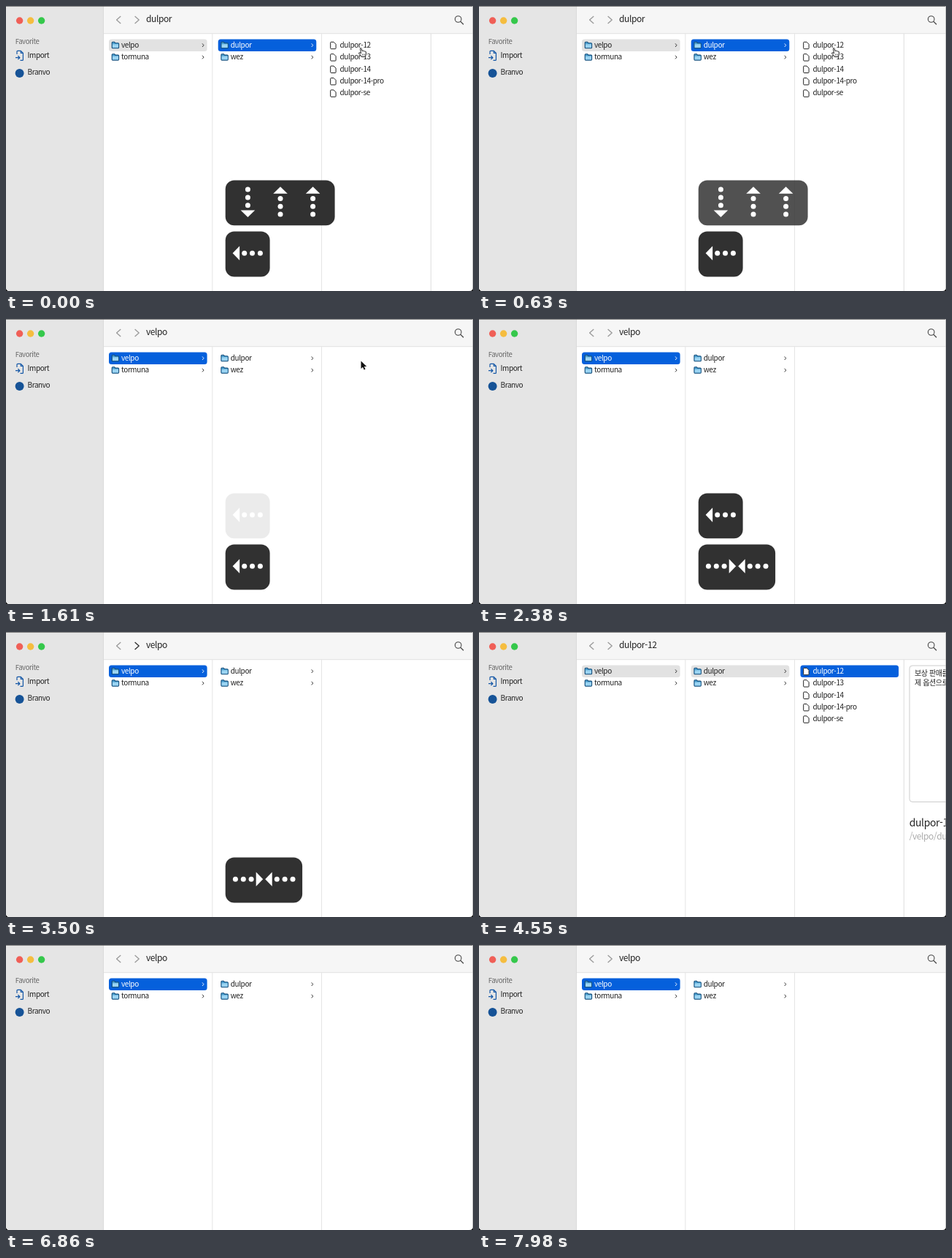
These frames come from a looping animation (640x390 px, 8 s). An HTML page:

```html
<!DOCTYPE html>
<html lang="ko">
<head>
<meta charset="utf-8">
<style>
  html, body { margin: 0; width: 100%; height: 100%; overflow: hidden; background: #111; }
  svg { display: block; width: 640px; height: 390px; }
  text { font: 10px "Noto Sans CJK KR", "Noto Sans", sans-serif; letter-spacing: -.4px; fill: #222; white-space: pre; }
</style>
</head>
<body>
<svg id="stage" viewBox="0 0 640 390"></svg>
<script>
const LOOP = 8000, FRAME = 70, FADE = 450;
const BLUE = '#0560dc', GREY = '#e2e2e2';
const stage = document.getElementById('stage');

const columns = [
  { x: 141, names: ['velpo', 'tormuna'] },
  { x: 290.7, names: ['dulpor', 'wez'] },
  { x: 440.5, names: ['dulpor-12', 'dulpor-13', 'dulpor-14', 'dulpor-14-pro', 'dulpor-se'], files: true }
];

// [time, depth of the selected item]
const selections = [[0, 2], [1190, 1], [1680, 2], [1820, 1], [3640, 2], [4200, 3], [5180, 2], [5460, 1]];

// Each card holds [time, direction] key presses; newer cards push older ones up.
const cards = [
  { keys: [[-2, 'down'], [-2, 'up'], [-2, 'up']], fade: 560 },
  { keys: [[-1, 'left']], fade: 1200 },
  { keys: [[1190, 'left']], fade: 2850 },
  { keys: [[1680, 'right'], [1820, 'left']], fade: 3500 }
];
const angles = { left: 0, up: 90, right: 180, down: 270 };

const clamp = v => Math.max(0, Math.min(1, v));
const between = (t, a, b) => t >= a && t < b;
const rect = (x, y, w, h, fill, extra = '') =>
  `<rect x="${x}" y="${y}" width="${w}" height="${h}" fill="${fill}" ${extra}/>`;
const circle = (x, y, r, fill, extra = '') =>
  `<circle cx="${x}" cy="${y}" r="${r}" fill="${fill}" ${extra}/>`;
const path = (d, stroke, width = 1, fill = 'none', extra = '') =>
  `<path d="${d}" stroke="${stroke}" stroke-width="${width}" fill="${fill}" stroke-linejoin="round" ${extra}/>`;
const text = (x, y, str, size = 10, fill = '#222') =>
  `<text x="${x}" y="${y}" style="font-size:${size}px;fill:${fill}">${str}</text>`;
const at = (x, y, body) => `<g transform="translate(${x} ${y})">${body}</g>`;

const folder = path('M.6 1.6Q.6.6 1.5.6H4L5.2 2H9Q10 2 10 3V8Q10 9 9 9H1.5Q.6 9 .6 8Z', '#174f7c', 1.1, '#4b9fcf') +
  rect(1.4, 3.6, 8, 4.7, '#9bd4f2');
const page = path('M.6 1.4Q.6.6 1.4.6H5L8 3.6V9Q8 10 7 10H1.5Q.6 10 .6 9Z', '#222', 1, '#fff');
const hand = path('M2.4 1.4Q3.6.2 4.2 1.7L5 5Q6.2 4.2 6.8 5.2Q8 4.5 8.5 5.6Q10 5 10.3 6.5L10.4 9.5L9.4 13H4.3Q3.2 10.7.7 8.6Q.2 7.2 1.8 7.2L3.5 8.4Z', '#222', 1, '#fff') +
  path('M5.4 9V11.5M7.1 9V11.5M8.8 9V11.5', '#333', .6);
const arrow = path('M0 0V10.5L2.5 8.3L4.2 12L6 11.2L4.3 7.6H7.7Z', '#fff', 1, '#111', 'paint-order="stroke"');

function chrome(title, backDark, forwardDark) {
  const nav = dark => dark ? '#2d2d2d' : '#9a9a9a';
  return rect(134, 0, 506, 38, '#f6f6f6') + rect(134, 37.3, 506, .9, '#dedede') +
    rect(0, 0, 133.5, 390, '#e5e5e5') + rect(133, 0, .8, 390, '#d4d4d4') +
    ['#f05f57', '#f5bd3f', '#35c84b'].map((c, i) => circle(18.6 + 15 * i, 20, 4.7, c)).join('') +
    text(12.7, 52.2, 'Favorite', 9.5, '#666') +
    path('M15 66V62.3Q15 61.4 16 61.4H20.3L23.4 64.5V73.5Q23.4 74.4 22.5 74.4H19.5M20.3 61.4V64.5H23.4', '#1457a6', 1.2) +
    path('M13 70.7H18.7M16.4 68.3L18.9 70.7L16.4 73.1', '#1457a6', 1.2) +
    text(29.5, 70.7, 'Import') +
    circle(18.6, 92, 6, '#165397') + text(29.5, 94.3, 'Branvo') +
    path('M157.2 14L151.6 19L157.2 24.1', nav(backDark), 1.3) +
    path('M176.6 14L182.2 19L176.6 24.1', nav(forwardDark), 1.3) +
    text(192, 22.3, title, 12) +
    circle(619.7, 18, 4.3, 'none', 'stroke="#444" stroke-width="1.1"') +
    path('M622.8 21.1L627 25.2', '#444', 1.3);
}

function column({ x, names, files }, index, depth) {
  return rect(x + 141.4, 38, .9, 352, '#e2e2e2') + names.map((name, i) => {
    const y = 45.4 + 16.4 * i;
    const picked = i === 0 && index < depth;
    const active = picked && index === depth - 1;
    const ink = active ? '#fff' : '#222';
    return (picked ? rect(x, y, 134.6, 16.6, active ? BLUE : GREY, 'rx="3.5"') : '') +
      at(x + 3.6, y + 3.3, files ? page : folder) +
      text(x + 17, y + 11.4, name, 10, ink) +
      (files ? '' : path(`M${x + 128} ${y + 6}l2 2.3l-2 2.3`, ink, .9));
  }).join('');
}

function preview() {
  return rect(590, 46, 80, 186.5, '#fff', 'rx="4" stroke="#ccc"') +
    text(597, 60, '보상 판매를') + text(597, 73, '제 옵션으로') +
    text(589.7, 266.3, 'dulpor-12', 14) +
    text(589.7, 284.3, '/velpo/dulpor/dulpor-12', 12, '#aaa');
}

function key(direction, x) {
  return `<g transform="translate(${x} 29.7) rotate(${angles[direction]})">` +
    '<path d="M-20.8 0L-11.3 -9.8V9.8Z" fill="#fff"/>' +
    [-4.7, 6.1, 17].map(d => circle(d, 0, 3.5, '#fff')).join('') + '</g>';
}

function card({ keys, fade }, index, t) {
  const opacity = clamp(1 - (t - fade) / FADE);
  const pressed = keys.filter(k => k[0] <= t);
  if (!pressed.length || !opacity) return '';
  const newer = cards.slice(index + 1).filter(c => c.keys[0][0] <= t).length;
  return `<g opacity="${opacity}">` + at(300.7, 308.6 - 70.2 * newer,
    rect(0, 0, 16.4 + 44.5 * pressed.length, 61.8, '#313131', 'rx="12"') +
    pressed.map((k, i) => key(k[1], 30.7 + 44.6 * i)).join('')) + '</g>';
}

function cursor(t, depth) {
  if (t < 2100) return depth > 1 ? at(483, 56.5, hand) : at(486.5, 57.5, arrow);
  if (between(t, 5110, 6020)) return at(153.6, 19.6 - 8 * (1 - clamp((t - 5110) / 210)), hand);
  return '';
}

function draw(t) {
  const depth = selections.filter(s => s[0] <= t).pop()[1];
  const title = columns[depth - 1].names[0];
  stage.innerHTML =
    '<clipPath id="window"><path d="M0 0H640V385Q640 390 635 390H5Q0 390 0 385Z"/></clipPath>' +
    '<g clip-path="url(#window)">' + rect(0, 0, 640, 390, '#fff') +
    chrome(title, between(t, 5110, 6090), between(t, 3360, 4410)) +
    columns.slice(0, depth + 1).map((c, i) => column(c, i, depth)).join('') +
    (depth === 1 ? '' : rect(581.9, 38, .9, 352, '#e2e2e2')) +
    (depth === 3 ? preview() : '') +
    rect(0, 0, 640, .8, '#666') + rect(639.3, 0, .7, 390, '#bbb') + '</g>' +
    cards.map((c, i) => card(c, i, t)).join('') + cursor(t, depth);
}

let last = -1;
function tick() {
  const t = Math.floor(performance.now() % LOOP / FRAME) * FRAME;
  if (t !== last) draw(last = t);
  requestAnimationFrame(tick);
}
tick();
</script>
</body>
</html>
```
